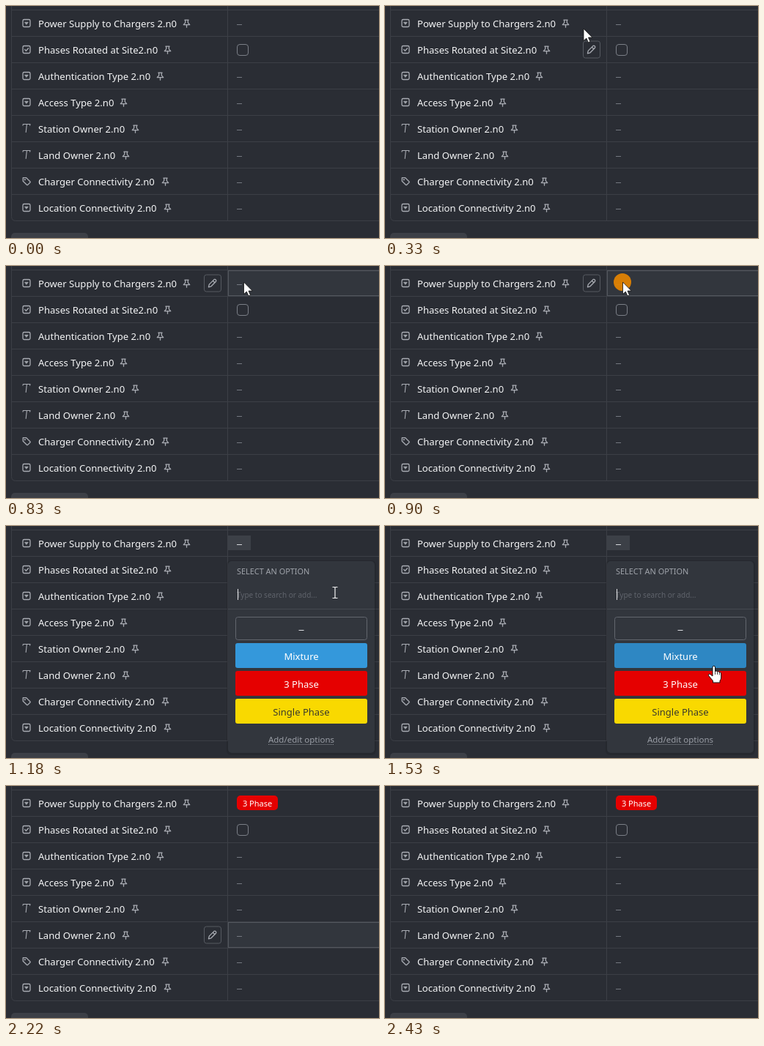
Animation, 509 px wide and 317 px high, one loop 2980 ms. Source, as an HTML page:

```html
<!DOCTYPE html>
<html lang="en">
<head>
<meta charset="utf-8">
<title>Field picker</title>
<style>
  html, body { margin: 0; width: 100%; height: 100%; overflow: hidden; background: #2a2d34; }
  svg { display: block; width: 509px; height: 317px; font-family: "Noto Sans", "Open Sans", sans-serif; }
  .label { font-size: 13.1px; fill: #f4f5f6; }
  .icon, .pin { fill: none; stroke: #a9acb3; stroke-width: 1.3; stroke-linejoin: round; stroke-linecap: round; }
  .rule { fill: none; stroke: #3c3f46; }
  .dash { stroke: #747880; }
  .option { font-size: 13px; text-anchor: middle; }
</style>
</head>
<body>
<svg id="stage" viewBox="0 0 509 317"></svg>
<script>
const LOOP = 2980, STEP = 70, ROW = 36;
const stage = document.getElementById("stage");

// label, icon, pin centre, has a checkbox
const rows = [
  ["Power Supply to Chargers 2.n0", "select", 246.5],
  ["Phases Rotated at Site2.n0", "check", 220.5, true],
  ["Authentication Type 2.n0", "select", 210.5],
  ["Access Type 2.n0", "select", 160.5],
  ["Station Owner 2.n0", "text", 176.5],
  ["Land Owner 2.n0", "text", 163.5],
  ["Charger Connectivity 2.n0", "tag", 217.5],
  ["Location Connectivity 2.n0", "select", 220.5]
];

// label, fill, hovered fill, text colour
const options = [
  ["–", "#32363d", "#3e4249", "#dcdee2"],
  ["Mixture", "#3498db", "#2e87c3", "#fff"],
  ["3 Phase", "#e50000", "#cc0000", "#fff"],
  ["Single Phase", "#f9d900", "#dfc200", "#3a3a2c"]
];

const frame = '<rect x="-5" y="-5" width="10" height="10" rx="1.8"/>';
const icons = {
  select: frame + '<path d="M-2.2-1.2H2.2L0 1.6Z" fill="#a9acb3" stroke-width=".8"/>',
  check: frame + '<path d="M-2.3 0L-.6 1.8L2.5-1.7"/>',
  text: '<path d="M-5-4.4L-4.6-6H5L4.6-4.4M.4-6L-.8 5" stroke-width="1.1"/>',
  tag: '<path d="M-4.8-4.8H-.3L5 .5Q5.4 1 5 1.5L1.5 5Q1 5.4.5 5L-4.8-.3Z"/><circle cx="-2.2" cy="-2.2" r=".5"/>'
};
const pin = '<path d="M-2.6-4.8H2.6M-1.8-4.8V-1.2L-4.2 1.7H4.2L1.8-1.2V-4.8M0 1.7V5.2"/>';

const at = (x, y, body, attrs = "") => `<g transform="translate(${x} ${y})" ${attrs}>${body}</g>`;
const dash = (x, y, attrs = 'class="dash"') => `<path d="M${x} ${y}h7" ${attrs}/>`;

const tableRow = ([label, icon, pinX, checkbox], i) => {
  const y = 24 + ROW * i;
  const value = checkbox
    ? `<rect x="315.5" y="${y - 7.5}" width="15" height="15" rx="3.5" fill="none" stroke="#7b7f87"/>`
    : dash(315, y + 1.5, `class="dash" id="value${i}"`);
  return `<path class="rule" d="M7.5 ${y - 18.5}H509"/>
    ${at(28, y - .5, icons[icon], 'class="icon"')}
    <text class="label" x="44" y="${y + 5}">${label}</text>
    ${at(pinX, y, pin, 'class="pin"')}${value}`;
};

const optionButton = ([label, fill, , color], i) => {
  const box = i ? `x="313" y="${122 + 38 * i}" width="180" height="34"`
                : 'x="313.5" y="124.5" width="179" height="31" stroke="#62666e"';
  const mark = i ? `<text class="option" x="403" y="${145 + 38 * i}" fill="${color}">${label}</text>`
                 : dash(399.5, 142.5, `stroke="${color}"`);
  return `<rect id="option${i}" ${box} rx="3" fill="${fill}"/>${mark}`;
};

stage.innerHTML = `
  <rect width="509" height="317" fill="#2a2d34"/>
  <rect x="7" y="310" width="105" height="20" rx="5" fill="#3c3f46"/>
  <rect id="cell" x="303.5" width="220" height="34" fill="#32363d" stroke="#53575e"/>
  ${rows.map(tableRow).join("")}
  <path class="rule" d="M7.5 0V287.5Q7.5 293.5 13.5 293.5H509M302.5 0V293.5"/>
  <g id="edit">
    <rect x="270.5" y="-11.5" width="23" height="23" rx="3" fill="#2a2d34" stroke="#565a61"/>
    <path class="icon" d="M276.4 5.4L277.3 1.6L283.8-4.9Q284.9-5.9 286.2-4.7Q287.4-3.4 286.4-2.3L280 4.3ZM282.3-3.3L284.9-.8"/>
  </g>
  <g id="pill">
    <rect x="315" y="13" width="56" height="20" rx="5" fill="#e50000"/>
    <text x="343" y="27.5" font-size="11" fill="#fff" text-anchor="middle">3 Phase</text>
  </g>
  <g id="menu">
    <rect x="303" y="13" width="31" height="20" fill="#3c4047"/>
    ${dash(315, 25.5, 'stroke="#d5d7db"')}
    <rect x="301" y="47" width="204" height="266" rx="6" fill="#000" opacity=".12"/>
    <rect x="303" y="48" width="200" height="262" rx="5" fill="#32363d"/>
    <text x="315" y="66" font-size="10.9" fill="#a0a4ab">SELECT AN OPTION</text>
    <text x="315" y="98" font-size="10" fill="#60646c">Type to search or add...</text>
    <path id="caret" d="M316.5 86V101" stroke="#e4e5e8"/>
    <path d="M303 113.5H503" stroke="#454950"/>
    <rect id="band" x="303" y="196" width="200" height="38" fill="#3e4249"/>
    ${options.map(optionButton).join("")}
    <text x="403" y="296" font-size="11.5" fill="#9a9ea6" text-anchor="middle">Add/edit options</text>
    <path d="M358 298.5H448" stroke="#8a8e96" stroke-dasharray="1 1"/>
  </g>
  <circle id="click" r="12" fill="#e58400"/>
  <g id="pointer" stroke-linejoin="round">
    <path id="arrow" d="M.5 0V16.5L4.3 13L6.9 18.8L9.5 17.7L7 12H12.3Z" fill="#fff" stroke="#111" stroke-width=".8"/>
    <path id="beam" d="M-3.5-7.5H-1Q0-7.5 0-6.5Q0-7.5 1-7.5H3.5M0-6.5V6.5M-3.5 7.5H-1Q0 7.5 0 6.5Q0 7.5 1 7.5H3.5" fill="none" stroke="#f2f2f2" stroke-width="1.2"/>
    <g id="hand" stroke="#111">
      <path d="M.5 15V3Q.5 1.2 2.2 1.2T4 3V9Q4 7.8 5.5 7.9T7 9.5Q7.2 8.5 8.5 8.7T9.8 10.4Q10.2 9.6 11.2 10T12.2 12V17Q12.2 19.5 10.5 21.5V24H1V21.5L-5 14.5Q-5.7 12.5-4 12.3T-1 14Z" fill="#fff"/>
      <path d="M4 9V13M7 9.5V13M9.8 10.4V13.5" fill="none" stroke-width=".8"/>
    </g>
  </g>`;

// step, x, y of the pointer tip
const path = [
  [0, 420, 300], [1, 385, 205], [2, 300, 80], [3, 270.5, 31], [4, 274, 21], [6, 298, 17],
  [8, 318, 20], [10, 324, 22], [11, 324, 22], [12, 328, 26], [13, 360, 45], [14, 420, 75],
  [15, 449, 91], [17, 449, 118], [19, 448, 165], [21, 445, 215], [23, 444, 221],
  [27, 444, 221], [28, 452, 216], [29, 492, 205]
];

// first step, last step, row, value cell lit
const hovers = [
  [1, 1, 5, true], [2, 2, 2, true], [3, 3, 1, false], [4, 6, 0, false],
  [7, 11, 0, true], [28, 31, 5, true]
];

const find = id => document.getElementById(id);
const show = (id, on) => find(id).setAttribute("display", on ? "inline" : "none");
const move = (id, x, y) => find(id).setAttribute("transform", `translate(${x} ${y})`);
const within = (k, from, to) => k >= from && k <= to;

function pointerAt(k) {
  const i = path.findIndex(p => p[0] >= k);
  if (k < 0 || i < 0) return null;
  if (i === 0) return path[0].slice(1);
  const [k0, x0, y0] = path[i - 1], [k1, x1, y1] = path[i];
  const f = (k - k0) / (k1 - k0);
  return [x0 + (x1 - x0) * f, y0 + (y1 - y0) * f];
}

function draw(time) {
  const k = time < 130 ? -1 : Math.floor((time - 120) / STEP);
  const menuOpen = within(k, 12, 27), chosen = k >= 28;

  const hover = hovers.find(([from, to]) => within(k, from, to));
  show("edit", hover);
  show("cell", hover && hover[3]);
  if (hover) {
    const top = ROW * hover[2];
    move("edit", 0, 23.5 + top);
    move("cell", 0, 6.5 + top);
  }

  show("menu", menuOpen);
  show("caret", k <= 20);
  show("band", k >= 26);
  show("pill", chosen);
  show("value0", !chosen && !menuOpen);

  const pos = pointerAt(k);
  show("pointer", pos);
  if (pos) move("pointer", ...pos);
  const over = menuOpen && pos[1] >= 124 ? Math.floor((pos[1] - 122) / 38) : -1;
  options.forEach(([, fill, dark], i) => find("option" + i).setAttribute("fill", i === over ? dark : fill));
  const typing = within(k, 15, 16);
  show("beam", typing);
  show("hand", over >= 0);
  show("arrow", !typing && over < 0);

  const clicking = k === 11 || within(k, 26, 27);
  show("click", clicking);
  if (clicking) {
    move("click", ...pos);
    find("click").setAttribute("opacity", k === 27 ? .5 : .92);
  }
}

const start = performance.now();
function tick() {
  draw((performance.now() - start) % LOOP);
  requestAnimationFrame(tick);
}
tick();
</script>
</body>
</html>
```
